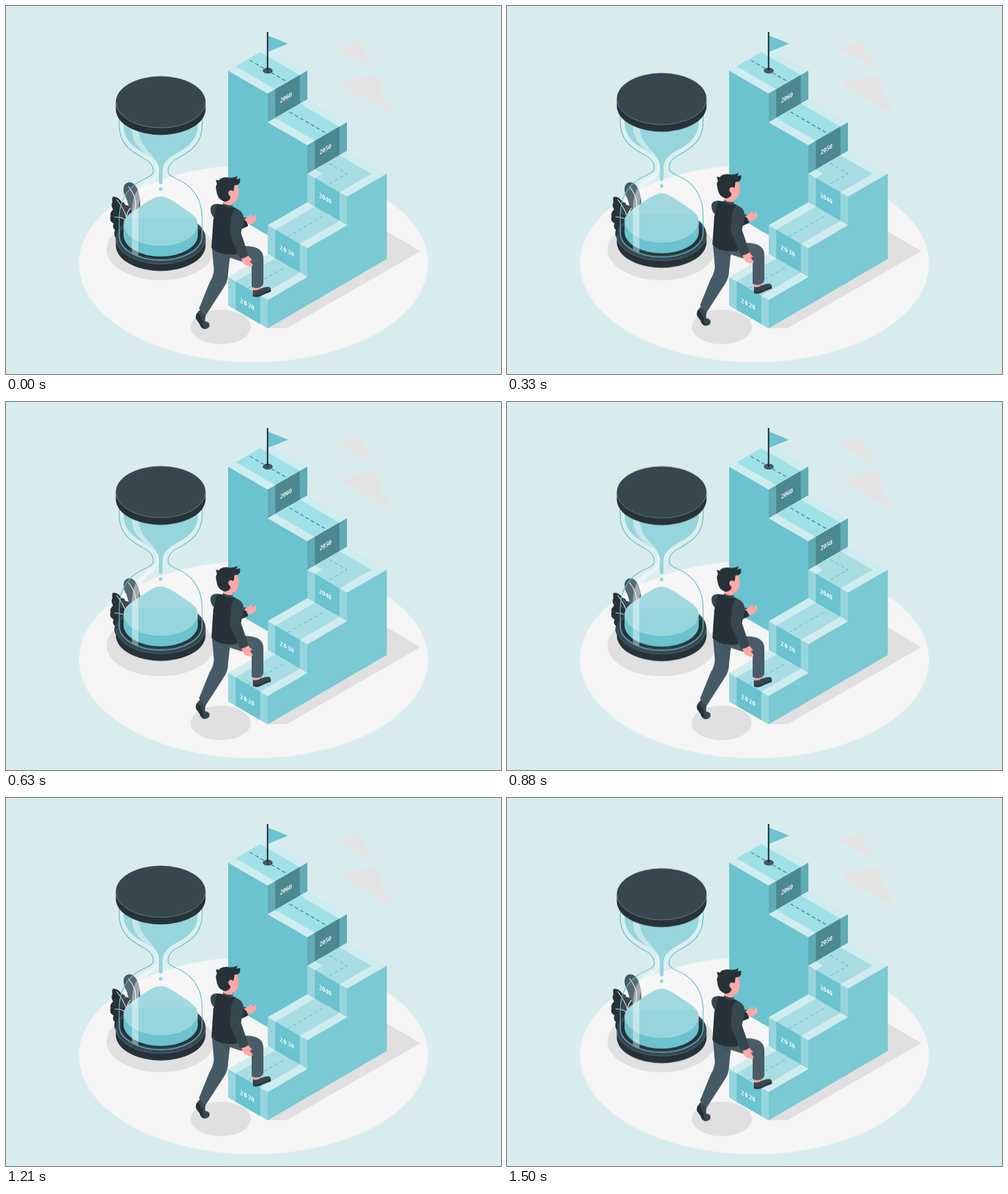
An HTML page that plays this animation: 800 by 595 pixels, repeating every 1540 ms.

```html
<!DOCTYPE html>
<html lang="en">
<head>
<meta charset="utf-8">
<title>Stairs through the years</title>
<style>
  html, body { margin: 0; width: 100%; height: 100%; overflow: hidden; background: #d9eced; }
  svg { display: block; width: 100vw; height: 100vh; }
  .float { animation: float 1540ms linear infinite; }
  @keyframes float {
    0% { transform: translateY(0); }
    48.4% { transform: translateY(-11.7px); }
    96.1% { transform: translateY(.3px); }
    100% { transform: translateY(0); }
  }
  text { font: bold 11px "Liberation Serif", serif; fill: #fff; text-anchor: middle; }
  .dash { fill: none; stroke-width: 1.2; stroke-dasharray: 6 4; vector-effect: non-scaling-stroke; }
  .ink { fill: #263238; }
  .slate { fill: #37474f; }
  .cloth { fill: #455a64; }
  .skin { fill: #ffa8a7; }
  .teal { fill: #6bc3cf; }
  .pale { fill: #97d5dc; }
  .top { fill: #cfecef; }
  .floor { fill: #f5f5f5; }
  .shade { fill: #e0e0e0; }
  .cloud { fill: #e5e4e4; }
  .vein { fill: none; stroke: #fff; stroke-width: 1.1; stroke-linecap: round; }
  .glass { fill: none; stroke: #61c0cc; stroke-width: 1.3; }
</style>
</head>
<body>
<svg viewBox="0 0 800 595">
  <defs>
    <!-- step parts in unit coordinates, placed by isometric matrices -->
    <g id="topUp">
      <rect class="top" width="1" height="1"/>
      <rect x=".19" width=".62" height="1" fill="#a8dde3"/>
      <path class="dash" stroke="#6bbfc9" d="M.5 0V.95"/>
    </g>
    <g id="topDown">
      <rect class="top" width="1" height="1"/>
      <rect y=".19" width="1" height=".62" fill="#a0e1e8"/>
      <path class="dash" stroke="#3d838d" d="M.05 .5H.96"/>
    </g>
    <g id="riserLit">
      <rect class="pale" width="1" height="1"/>
      <rect class="teal" x=".19" width=".62" height="1"/>
    </g>
    <g id="riserDark">
      <rect width="1" height="1" fill="#60abb5"/>
      <rect x=".19" width=".62" height="1" fill="#4b8890"/>
    </g>
    <path id="side" d="M183 176V192C183 223 202 235 222 246C234 252 238 259 238 267C238 275 228 277 215 284C196 295 183 315 183 343V372"/>
  </defs>

  <rect width="800" height="595" fill="#d9eced"/>
  <g class="cloud">
    <path d="M536 66Q541 63 545 67Q547 62 555 64Q558 58 567 58Q574 57 578 65Q579 70 579 76Q586 79 588 88Q592 95 588 97Q584 97 578 92L541 72Q537 70 536 66Z"/>
    <path d="M543 124Q544 114 556 125Q561 115 572 117Q579 111 589 112Q599 110 604 121Q608 130 607 150Q616 151 620 161Q625 168 621 172Q617 172 611 168L551 133Q543 130 543 124Z"/>
  </g>
  <ellipse class="floor" cx="400" cy="416.5" rx="282" ry="159.5"/>
  <g class="shade">
    <ellipse cx="249.5" cy="393.5" rx="87" ry="50"/>
    <ellipse cx="347" cy="519" rx="48.5" ry="28"/>
    <path d="M423 521H453.500L669.500 396.500L615 364Z"/>
  </g>

  <g id="stairs">
    <path class="teal" d="M359 104.500L423 141.500V188L487 225V317.500L423 354.500V370.500L359 333.500Z"/>
    <path fill="#7ac9d3" d="M423 475L487 438V391.500L551 354.500V308L615.500 271V409L423 521Z"/>
    <use href="#topDown" transform="matrix(64 37 64 -37 359 104.500)"/>
    <use href="#riserDark" transform="matrix(64 -37 0 46.500 423 141.500)"/>
    <use href="#topDown" transform="matrix(64 37 64 -37 423 188)"/>
    <use href="#riserDark" transform="matrix(64 -37 0 46.500 487 225)"/>
    <g transform="matrix(64 37 64 -37 487 271.200)">
      <rect class="top" width="1" height="1"/>
      <path fill="#a8dde3" d="M.19 0H.81V.81H0V.19H.19Z"/>
      <path class="dash" stroke="#6bbfc9" d="M.05 .5H.5V0"/>
    </g>
    <use href="#riserLit" transform="matrix(64 37 0 46.500 487 271)"/>
    <use href="#topUp" transform="matrix(64 37 64 -37 423 354.500)"/>
    <use href="#riserLit" transform="matrix(64 37 0 46.500 423 354.500)"/>
    <use href="#topUp" transform="matrix(64 37 64 -37 359 438.200)"/>
    <use href="#riserLit" transform="matrix(64 37 0 46 359 438.200)"/>
    <text transform="matrix(.866 .5 0 1 389.700 485.500)" dx="0 1.600 2.400 .5">2020</text>
    <text transform="matrix(.866 .5 0 1 453.700 399.500)" dx="0 1.600 2.400 .5">2030</text>
    <text transform="matrix(.866 .5 0 1 516 314.500)" letter-spacing=".3">2040</text>
    <text transform="matrix(.866 -.5 0 1 516.300 235)">2050</text>
    <text transform="matrix(.866 -.5 0 1 452.500 151.500)">2060</text>
    <ellipse class="cloth" cx="423" cy="104.500" rx="7.500" ry="4.200" stroke="#37474f"/>
    <path class="teal" d="M424 48L456 61L424 74Z"/>
    <path d="M422.800 42V105" stroke="#263238" stroke-width="2.400"/>
  </g>

  <g id="plant">
    <path class="cloth" d="M190 296C190 287 197 283 204 286C213 291 217 306 217 320C217 335 211 348 206 360H196C202 340 199 322 194 310C191 305 190 301 190 296Z"/>
    <path class="ink" d="M172 309C178 307 184 312 187 317Q192 317 193 322Q199 321 201 328Q205 333 203 341L200 372Q190 382 179 377Q173 371 176 362Q171 358 174 352Q166 347 169 340Q167 335 173 329Q169 322 172 317Q171 312 172 309Z"/>
    <path class="vein" d="M198 292Q212 310 209 326Q204 345 198 362M179 313Q191 328 195 343L197 365M176 341Q188 341 194 347M195 340Q196 332 201 327"/>
  </g>

  <g class="float">
    <g id="hourglass">
      <path class="ink" d="M177.500 375.500V387A72.500 41.500 0 0 0 322.500 387V375.500Z"/>
      <ellipse class="slate" cx="250" cy="375.500" rx="72.500" ry="41.500"/>
      <path d="M177.500 375.500A72.500 41.500 0 0 0 322.500 375.500" fill="none" stroke="#78909c" stroke-width=".5"/>
      <path class="ink" d="M185 372A65 36 0 0 0 315 372V362H185Z"/>
      <path class="teal" d="M190 352V370.500A60 34.600 0 0 0 310 370.500V352Z"/>
      <path class="pale" d="M190 354C190 341 201 335 213 327C226 318 239 308 250 308S274 318 287 327C299 335 310 341 310 354A60 34.600 0 0 1 190 354Z"/>
      <path d="M190 354A60 34.600 0 0 0 310 354" fill="none" stroke="#4fa6b1" stroke-width=".5"/>
      <path fill="#fff" fill-opacity=".1" d="M183 176V192C183 223 202 235 222 246C234 252 238 259 238 267C238 275 228 277 215 284C196 295 183 315 183 343H317C317 315 304 295 285 284C272 277 262 275 262 267C262 259 266 252 278 246C298 235 317 223 317 192V176Z"/>
      <path class="pale" d="M190 182V194C191 218 208 230 226 239C240 247 247 255 247 266V285A3 3 0 0 0 253 285V266C253 255 260 247 274 239C292 230 309 218 310 194V182Z"/>
      <circle class="pale" cx="250" cy="296.200" r="2.900"/>
      <g fill="#fff" fill-opacity=".42">
        <path d="M203.500 185V200C204 222 217 233 231 242C240 248 243 255 244 266C244 277 235 280 225 285C211 293 203.500 311 203.500 335V399Q208 402 214 404V335C214 310 222 297 232 288C241 282 247 277 247 265C247 254 241 248 235 240C222 227 214 215 214 197V185Z"/>
      </g>
      <use class="glass" href="#side"/>
      <use class="glass" href="#side" transform="matrix(-1 0 0 1 500 0)"/>
      <path class="glass" d="M183 372A67 39 0 0 0 317 372"/>
      <path class="ink" d="M177.500 155.300V167A72.500 41.500 0 0 0 322.500 167V155.300Z"/>
      <ellipse class="slate" cx="250" cy="155.300" rx="72.500" ry="41.700"/>
      <path d="M177.500 155.300A72.500 41.700 0 0 0 322.500 155.300" fill="none" stroke="#8fb0b8" stroke-width=".6"/>
    </g>

    <g id="man">
      <path class="skin" d="M314 488L325 495L322 501L313 494ZM399 452H411V460H399Z"/>
      <path class="slate" d="M309 497Q312 491 315 492Q318 498 323 499Q321 506 322 510Q330 511 329 517Q328 522 321 522Q315 521 313 514Q306 506 307 501Z"/>
      <path class="ink" d="M309 496Q306 500 307 506Q313 512 314 517Q317 523 323 522Q317 518 318 510Q315 501 309 496Z"/>
      <path class="slate" d="M399 459Q406 461 411 457Q418 454 425 454Q429 456 428 461Q419 464 411 469Q404 471 399 469Z"/>
      <path class="ink" d="M399 467Q405 469 412 466Q419 462 428 459V462Q419 465 411 469Q404 472 399 469Z"/>
      <path fill="#4a5d67" d="M348 398L385 388Q404 388 411 395Q416 400 416 408V449Q414 455 406 456Q400 456 397 454V417Q378 413 359 406Z"/>
      <path class="cloth" d="M333 391L336 427Q335 438 329 447L312 489Q315 496 323 500L352 455Q359 445 359 432L362 403Z"/>
      <path d="M350 402Q356 408 362 409" fill="none" stroke="#37474f"/>
      <path class="slate" d="M343 320Q332 319 330.500 327Q330 336 336 342Z"/>
      <path class="ink" d="M374 345L387 342Q391 348 391 356L380 361Z"/>
      <path class="skin" d="M384 345Q391 343 396 337L398 338L396 343L403 338Q406 343 403 348Q397 355 390 352Q389 347 384 345Z"/>
      <path class="ink" d="M341 320Q355 321 370 326Q382 333 383 350L373 401Q346 405 332 391L335 346Z"/>
      <path class="skin" d="M353 309H368V317H366L364 325Q356 325 350 320Z"/>
      <path class="slate" d="M351 319Q358 323 367 322L365 327Q356 326 350 322Z"/>
      <path class="skin" d="M361 294L366 289H374Q376 293 376 304Q375 313 370 317Q364 319 359 314Z"/>
      <path class="ink" d="M341 288L339 281L344 282Q347 277 357 277Q367 279 374 275Q374 278 372 280L378 279Q380 285 375 289L369 290Q369 297 367 300Q365 297 361 299Q358 302 361 306Q364 309 362 312Q358 317 352 316Q341 312 340 298Q338 292 341 288Z"/>
      <path class="skin" d="M367 300Q365 296.500 361 299Q358 302 360.500 306Q363 308 366 306Z"/>
      <path class="skin" d="M381 408L391 403L398 411L394 412L399 419Q397 423 390 420Q382 418 381 408Z"/>
      <path class="slate" d="M370 327Q382 330 384 341Q385 352 379 365L392 403Q386 409 378 408L363 373Q360 366 363 352Q363 335 370 327Z"/>
    </g>
  </g>
</svg>
</body>
</html>
```
